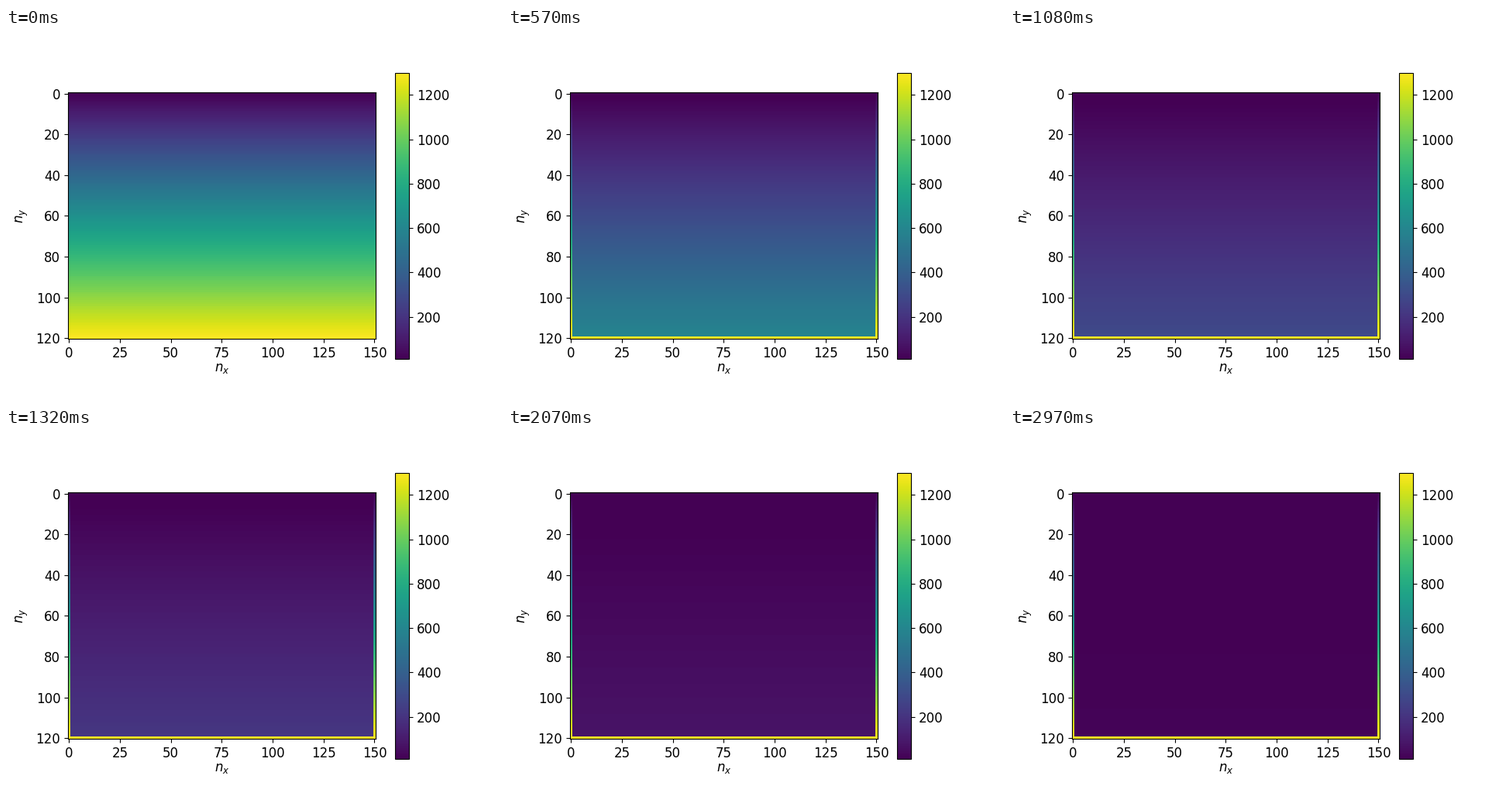
A matplotlib script that plays this animation: 640 by 480 pixels, repeating every 3000 ms.

```python
import matplotlib.pyplot as plt
import numpy as np
from matplotlib.animation import FuncAnimation

W, H, DPI = 640, 480, 100
NX, NY = 151, 121
FRAMES, INTERVAL = 100, 30
LOW, HIGH = 10, 1300
DECAY = 0.96

plt.rcParams.update({"font.family": "DejaVu Sans", "font.size": 12})

# Linear ramp from top to bottom; the edge cells stay fixed.
start = np.tile(np.linspace(LOW, HIGH, NY)[:, None], (1, NX))


def field(n):
    data = start.copy()
    data[1:-1, 1:-1] *= DECAY ** n
    return data


fig, ax = plt.subplots(figsize=(W / DPI, H / DPI), dpi=DPI)
image = ax.imshow(field(0), cmap="viridis", vmin=LOW, vmax=HIGH,
                  interpolation="nearest")
ax.set_xticks(range(0, NX, 25))
ax.set_yticks(range(0, NY, 20))
fig.colorbar(image, ax=ax, ticks=range(200, 1201, 200))


def axis_label(x, y, text, angle=0):
    fig.text(x / W, 1 - y / H, text, rotation=angle, rotation_mode="anchor",
             ha="center", va="baseline")


axis_label(278.4, 443, "$n_x$")
axis_label(23, 242.4, "$n_y$", 90)


def update(n):
    image.set_data(field(n))
    return (image,)


anim = FuncAnimation(fig, update, frames=FRAMES, interval=INTERVAL,
                     repeat=True, repeat_delay=0, blit=False)
plt.show()
```
